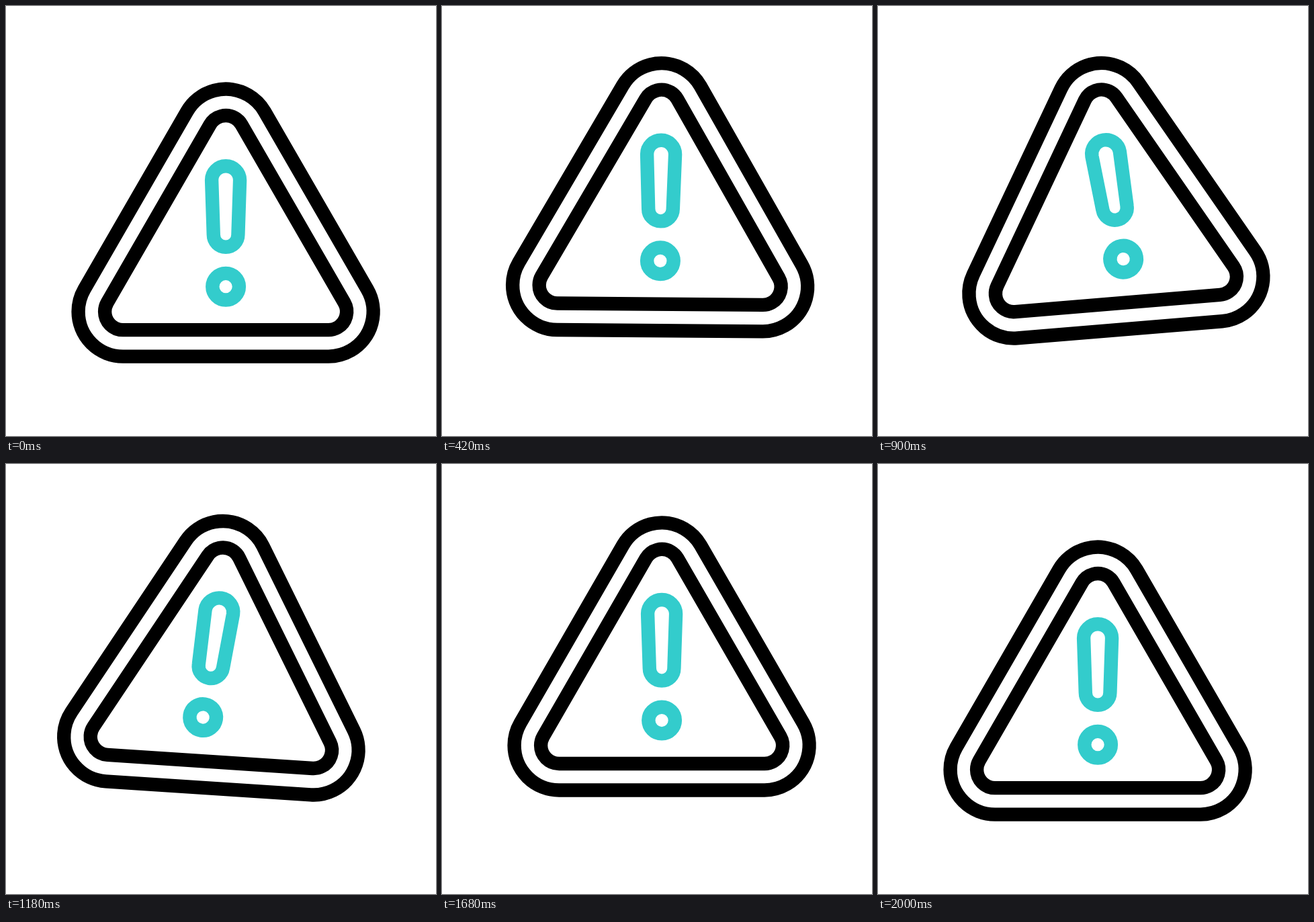
Recreate the animation shown at these times as an HTML page with a canvas. Size 640 by 640 pixels, loop 2.22 s.

```html
<!DOCTYPE html>
<html lang="en">
<head>
<meta charset="utf-8">
<title>Warning sign</title>
<style>
  html, body { margin: 0; width: 100%; height: 100%; overflow: hidden; background: #fff; }
  canvas { display: block; width: 100vmin; height: 100vmin; }
</style>
</head>
<body>
<canvas id="stage" width="640" height="640"></canvas>
<script>
const ctx = document.getElementById('stage').getContext('2d');
const LOOP = 2220, STEP = 20;
const LIFT = 38.4, TILT = 5 * Math.PI / 180;
const CX = 327.1, STROKE = 20.4;
const SIDE = 305.8, BASE_Y = 455, APEX_Y = BASE_Y - SIDE * Math.sqrt(3) / 2;

const smooth = x => {
  x = Math.min(1, Math.max(0, x));
  return x * x * (3 - 2 * x);
};

// Rise, hover, fall
const lift = t => LIFT * (smooth(t / 375) - smooth((t - 1625) / 375));

// Eased swing through the poses, one every 250 ms
const POSES = [0, 1, -1, 1, -1, 0];
function swing(t, start) {
  const x = Math.min(4.9999, Math.max(0, (t - start) / 250));
  const i = Math.floor(x);
  return TILT * (POSES[i] + (POSES[i + 1] - POSES[i]) * smooth(x - i));
}

function rotateAt(y, angle) {
  ctx.translate(CX, y);
  ctx.rotate(angle);
  ctx.translate(-CX, -y);
}

function roundTriangle(r) {
  const a = Math.PI / 6;
  ctx.beginPath();
  ctx.arc(CX, APEX_Y, r, -5 * a, -a);
  ctx.arc(CX + SIDE / 2, BASE_Y, r, -a, 3 * a);
  ctx.arc(CX - SIDE / 2, BASE_Y, r, 3 * a, 7 * a);
  ctx.closePath();
  ctx.stroke();
}

function exclamation() {
  ctx.beginPath();
  ctx.arc(CX, 259.2, 21, Math.PI, 0);
  ctx.arc(CX, 340.5, 18.3, 0, Math.PI);
  ctx.closePath();
  ctx.stroke();
  ctx.beginPath();
  ctx.arc(CX, 417.7, 19.8, 0, 2 * Math.PI);
  ctx.stroke();
}

function draw(t) {
  ctx.setTransform(1, 0, 0, 1, 0, 0);
  ctx.fillStyle = '#fff';
  ctx.fillRect(0, 0, 640, 640);
  ctx.lineWidth = STROKE;
  ctx.lineJoin = 'round';

  ctx.translate(0, -lift(t));
  rotateAt(123.7, swing(t, 375));
  ctx.strokeStyle = '#000';
  roundTriangle(66.6);
  roundTriangle(27.1);

  // The mark hangs in the sign and lags behind it
  rotateAt(248.4, swing(t, 425));
  ctx.strokeStyle = '#33cccc';
  exclamation();
}

const begin = performance.now();
function tick() {
  const t = (performance.now() - begin) % LOOP;
  draw(Math.min(2000, Math.floor(t / STEP) * STEP));
  requestAnimationFrame(tick);
}
tick();
</script>
</body>
</html>
```
